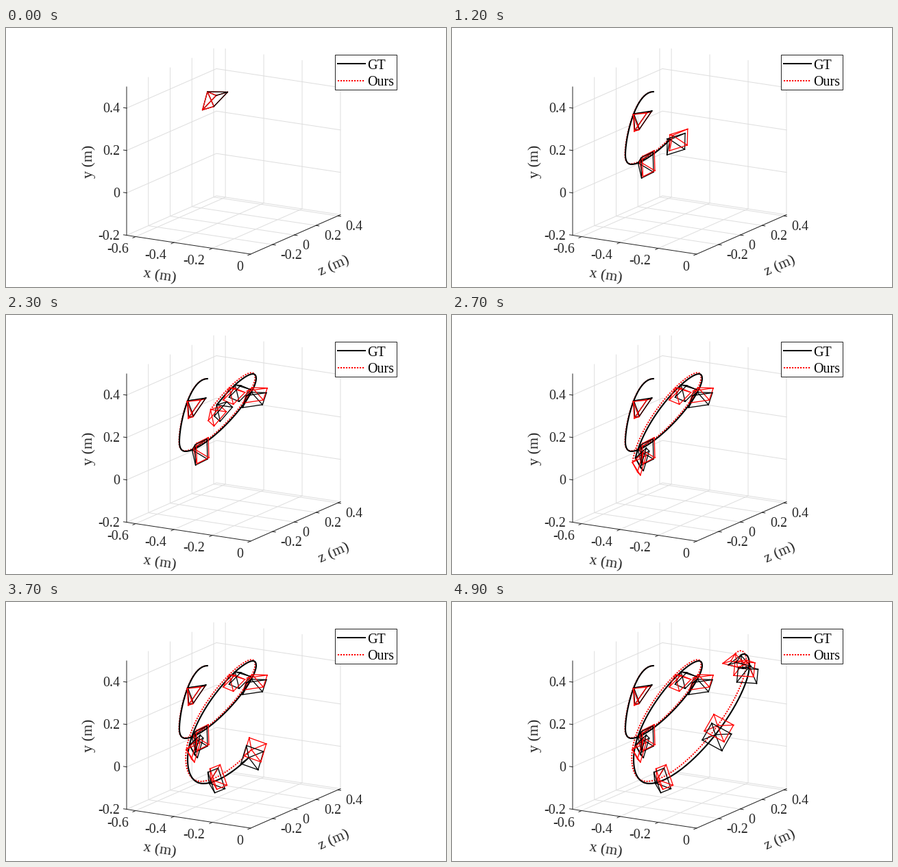
A matplotlib script for the animation above (5 s loop, 642 by 378 pixels).

```python
import numpy as np
import matplotlib.pyplot as plt
from matplotlib.animation import FuncAnimation
from matplotlib.patches import Rectangle

W, H, DPI = 642, 378, 96
PX = 72 / DPI  # points per pixel
FRAMES, INTERVAL = 50, 100
DARK, GRID = "#262626", "#dedede"
DOTS = (0, (1.1, 0.9))

plt.rcParams["font.family"] = "Liberation Serif"

fig = plt.figure(figsize=(W / DPI, H / DPI), dpi=DPI, facecolor="white")
ax = fig.add_axes([0, 0, 1, 1])
ax.set_xlim(0, W)
ax.set_ylim(H, 0)
ax.axis("off")

# Orthographic view of the plot box
X0, X1, Y0, Y1, Z0, Z1 = -0.647, 0, -0.2, 0.5, -0.4, 0.425
ORIGIN = np.array([176, 302.5])
X_AXIS = np.array([181, 27.5])
Y_AXIS = np.array([0, -216.5])
Z_AXIS = np.array([131, -57.5])


def project(x, y, z):
    return (ORIGIN + X_AXIS * (x - X0) / (X1 - X0)
            + Y_AXIS * (y - Y0) / (Y1 - Y0)
            + Z_AXIS * (z - Z0) / (Z1 - Z0))


def stroke(points, color, width, **kw):
    x, y = np.asarray(points, float).T
    return ax.plot(x, y, color=color, lw=width * PX, **kw)[0]


def label(x, y, text, size=20, color=DARK, **kw):
    ax.text(x, y, text, fontsize=size * PX, color=color, **kw)


def tick(at, direction):
    unit = direction / np.hypot(*direction)
    stroke([at, at + 4.5 * unit], DARK, 1, zorder=1)


def draw_axes():
    steps = np.array([-0.2, 0, 0.2, 0.4])
    for x in steps - 0.4:
        stroke([project(x, Y0, Z0), project(x, Y0, Z1), project(x, Y1, Z1)],
               GRID, 1, zorder=0)
        p = project(x, Y0, Z0)
        tick(p, -Z_AXIS)
        label(p[0] - 10.5, p[1] + 24, f"{round(x, 1) + 0:g}".replace("-0.0", "0"),
              ha="right")
    for y in steps:
        stroke([project(X0, y, Z0), project(X0, y, Z1), project(X1, y, Z1)],
               GRID, 1, zorder=0)
        p = project(X0, y, Z0)
        tick(p, -X_AXIS)
        label(p[0] - 10, p[1] + 6.5, f"{y:g}", ha="right")
    for z in steps:
        stroke([project(X1, Y0, z), project(X0, Y0, z), project(X0, Y1, z)],
               GRID, 1, zorder=0)
        p = project(X1, Y0, z)
        tick(p, X_AXIS)
        label(p[0] + 11.5, p[1] + 21, f"{z:g}")
    stroke([project(X0, Y1, Z0), project(X0, Y0, Z0), project(X1, Y0, Z0),
            project(X1, Y0, Z1)], DARK, 1, zorder=1)

    middle = dict(size=22, ha="center", va="center")
    label(224, 363, "x (m)", rotation=-8.5, **middle)
    label(121, 195, "y (m)", rotation=90, **middle)
    label(479, 348.5, "z (m)", rotation=24, **middle)


def draw_legend():
    ax.add_patch(Rectangle((479.5, 38.5), 90, 51, fc="white", ec=DARK,
                           lw=PX, zorder=10))
    stroke([(484, 52), (524, 52)], "black", 2, zorder=11)
    stroke([(484, 77), (524, 77)], "red", 2, zorder=11, ls=DOTS,
           dash_capstyle="butt")
    label(527, 60, "GT", color="black", zorder=11)
    label(527, 84, "Ours", color="black", zorder=11)


def swing(*turns):
    """Cosine easing between turning points given as (frame, value)."""
    times, values = np.array(turns, float).T

    def at(t):
        place = np.interp(t, times, np.arange(len(times)))
        i = np.minimum(place.astype(int), len(times) - 2)
        ease = (1 - np.cos(np.pi * (place - i))) / 2
        return values[i] + (values[i + 1] - values[i]) * ease

    return at


# The camera climbs and falls along a widening spiral
path_x = swing((-8, 355), (6.2, 253), (16.7, 365), (28.2, 265), (45.2, 434), (57, 380))
path_y = swing((0, 93), (8.1, 199), (18.3, 86), (32.3, 265), (48.2, 76), (57, 160))

# Sides of the image plane as it turns
across_x = swing((-4, -22), (15, 29), (26, 4), (42, 31), (57, 10))
across_y = swing((0, 5), (10, -9), (24, 8), (33, -6), (39.5, 16), (46, 1), (54, 15))
down_x = swing((1.5, -20), (9.5, 1), (23, -18), (33, 10), (39, -14), (45, -2), (51, -15))
down_y = swing((0, 21), (6, 32), (18, 15), (30, 31), (44, 22), (49.5, 3))

LOOK_AT = np.array([405, 228])
VIEW_DEPTH = 0.1
GAP = np.full((1, 2), np.nan)
# Edges between the centre (0) and the four corners (1 to 4)
NEAR = [(0, 1), (1, 2), (4, 1)]
FAR = [(0, 2), (0, 3), (0, 4), (2, 3), (3, 4)]
FIRST_KEPT, KEEP_EVERY = 3, 6


def vector(x, y, t):
    return np.stack([x(t), y(t)], axis=-1)


def centre(t, estimated):
    """The estimate runs slightly ahead and drifts up and left."""
    t = np.asarray(t, float)
    if not estimated:
        return vector(path_x, path_y, t)
    lead = 0.5 * np.minimum(t / 20, 1)
    return vector(path_x, path_y, t + lead) - 0.1 * t[..., None]


def frustum(t, estimated, edges):
    apex = centre(t, estimated)
    across = vector(across_x, across_y, t)
    down = vector(down_x, down_y, t)
    middle = apex + VIEW_DEPTH * (LOOK_AT - centre(t, False))
    first = middle - (across + down) / 2
    points = np.array([apex, first, first + across, first + across + down,
                       first + down])
    return np.vstack([np.vstack([points[list(e)], GAP]) for e in edges])


draw_axes()
draw_legend()

curves = [(False, stroke(GAP, "black", 2.1, zorder=3)),
          (True, stroke(GAP, "red", 1.9, zorder=2, ls=DOTS, dash_capstyle="butt"))]

# Near edges of the true camera cover the estimate; far ones lie below it
cameras = [(estimated, edges,
            stroke(GAP, "red" if estimated else "black", 1.3, zorder=z))
           for z, (estimated, edges) in enumerate(
               [(False, FAR), (True, FAR), (True, NEAR), (False, NEAR)], start=5)]


def update(frame):
    times = np.linspace(0, frame, frame * 10 + 1)
    for estimated, line in curves:
        line.set_data(*centre(times, estimated).T)
    shown = [*range(FIRST_KEPT, frame, KEEP_EVERY), frame]
    for estimated, edges, line in cameras:
        line.set_data(*np.vstack([frustum(t, estimated, edges) for t in shown]).T)
    return []


anim = FuncAnimation(fig, update, frames=FRAMES, interval=INTERVAL,
                     init_func=lambda: update(0), repeat=True, repeat_delay=0)
plt.show()
```
